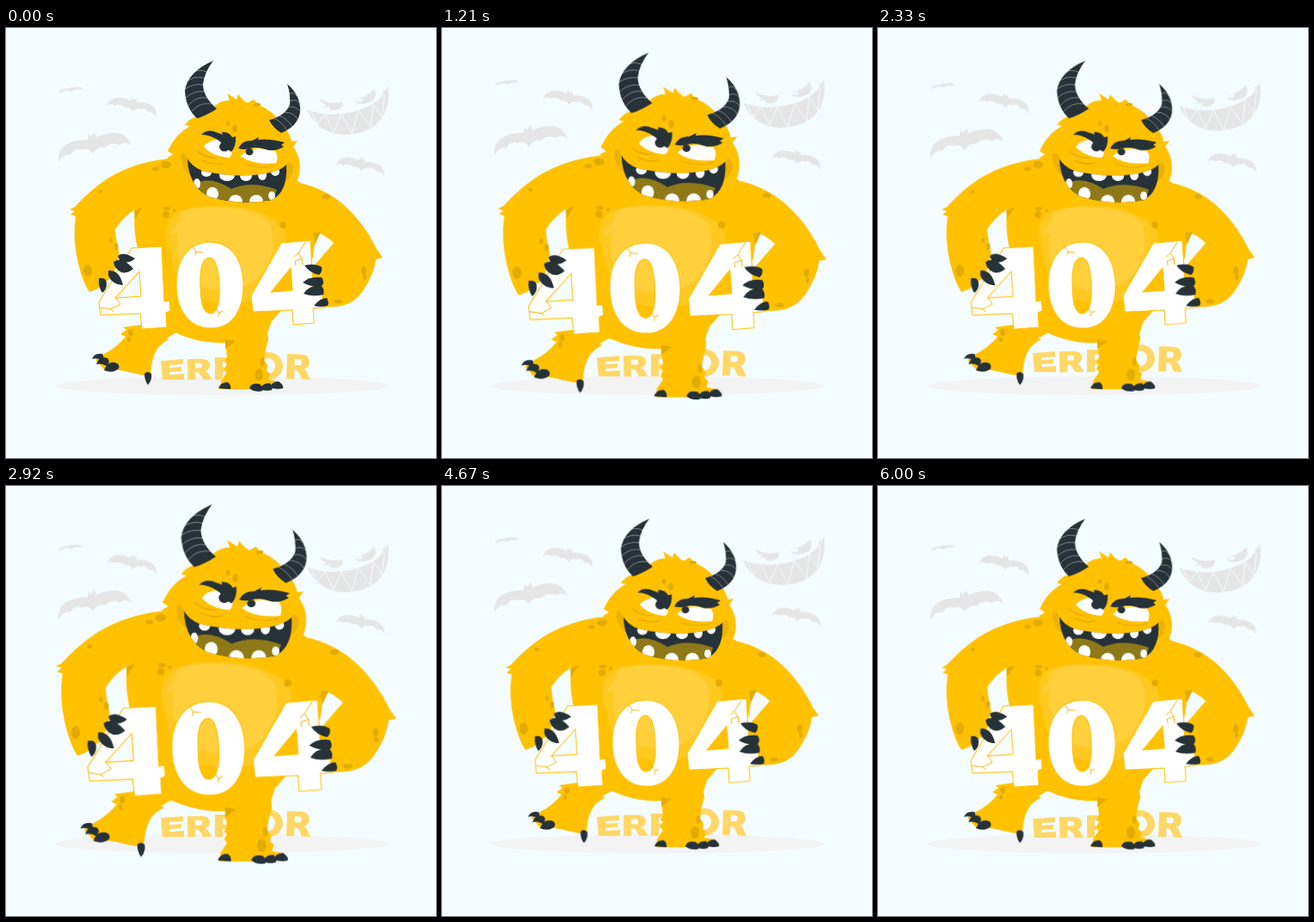
An HTML page for the animation above (6.04 s loop, 500 px wide and 500 px high).

```html
<!DOCTYPE html>
<html lang="en">
<head>
<meta charset="utf-8">
<title>404 error</title>
<style>
  html, body { margin: 0; width: 100%; height: 100%; overflow: hidden; background: #f4fcff; }
  svg { display: block; width: 100%; height: 100%; }
  #monster { transform-origin: 257px 229.5px; }
  .fur { fill: #ffc100; }
  .dark { fill: #263238; }
  .shade { fill: #e3ab00; }
  .grey { fill: #e6e6e6; }
  .white { fill: #fff; }
  .digit { fill: #fff; stroke: #ffc100; stroke-width: 1; fill-rule: evenodd; }
  .line { fill: none; stroke-linecap: round; stroke-linejoin: round; }
</style>
</head>
<body>
<svg viewBox="0 0 500 500" role="img" aria-label="404 ERROR">
  <defs>
    <path id="bat" d="M61 156Q60 142 69 136Q80 129 95 130L96 123L99 126L103 121L105 127Q116 122 127 122Q141 123 146 137Q140 131 132 136Q123 132 115 139Q107 137 101 146Q95 138 88 142Q81 138 75 147Q66 146 61 156Z"/>
    <path id="r" fill-rule="evenodd" d="M0 0H16Q26 0 26 8Q26 13 20 15Q23 16 24 18L28 25H18L14 18Q13 16 9 16V25H0ZM9 5V11H14Q17 11 17 8T14 5Z"/>
    <path id="mouth" d="M211 152Q216 161 228 166Q270 176 308 168Q320 165 326 159Q328 190 309 200Q272 207 236 196Q212 184 211 152Z"/>
    <clipPath id="lips"><use href="#mouth"/></clipPath>
  </defs>

  <g id="sky" class="grey">
    <use href="#bat"/>
    <use href="#bat" transform="matrix(-.682 0 0 .682 216.6 -2.4)"/>
    <use href="#bat" transform="matrix(-.67 0 0 .67 480.9 68.5)"/>
    <use href="#bat" transform="matrix(.33 0 0 .22 41.9 41.7)"/>
    <path d="M350 95Q374 104 401 98Q428 92 439 77L438 73L442 72L444 67Q448 92 434 109Q419 124 393 124Q363 123 350 95Z"/>
    <path d="M364 82Q375 89 391 86Q394 92 386 95Q380 97 375 94L378 91Q374 93 368 92L373 90Q367 88 364 82ZM403 83Q418 82 428 71Q432 78 427 84Q420 89 411 88Q407 88 406 85L413 86L415 82Z"/>
    <path class="line" stroke="#f4fcff" stroke-width="1" d="M355 97L362 112L371 100L381 121L390 100L402 123L410 96L424 116L427 88L437 104L440 78"/>
  </g>

  <ellipse cx="251" cy="416" rx="194" ry="11" fill="#f3f3f3"/>

  <g id="word" fill="#ffd766">
    <path d="M180 387L206 385V391L190 392V395L204 394V399L190 400V403L207 402V409H182Z"/>
    <use href="#r" transform="translate(211 385) rotate(-1) scale(1 .97)"/>
    <use href="#r" transform="translate(243 383) scale(1 1.04)"/>
    <path fill-rule="evenodd" d="M288 393A17 16 0 0 1 322 393A17 16 0 0 1 288 393ZM297 393A8 9 0 0 0 313 393A8 9 0 0 0 297 393Z"/>
    <use href="#r" transform="translate(327 379) rotate(2) scale(1 1.16)"/>
  </g>

  <g id="monster">
    <g class="fur">
      <path d="M205 149L188 152Q149 156 118 175Q97 189 80 208L74 211L80 213L75 217L81 219Q77 245 84 274Q89 295 97 307L107 303L114 296L124 290L132 264Q128 248 127 234Q136 220 150 211L214 200Z"/>
      <path d="M330 178Q366 183 392 205Q416 226 431 257L438 267L430 269Q428 286 416 304Q405 322 384 324L364 325L350 312L356 279L381 250Q372 241 360 237L320 230Z"/>
      <path d="M204 150L150 211Q147 236 155 265L161 330L192 352Q224 368 258 366L310 340L345 300L357 266L361 236L342 180L300 150Z"/>
      <path d="M165 332L158 345L136 348L140 351L133 356L139 359Q128 372 114 379L104 386L114 397Q134 397 146 401L160 404L168 402Q169 384 176 373Q180 367 190 362L186 361L200 353L250 330Z"/>
      <path d="M254 358L257 383L254 388L257 391L254 396L257 400L250 411L249 420H286L319 418L317 411L305 409L307 402L303 399L304 392L300 386Q301 374 305 362L304 355L309 340Z"/>
      <path d="M204 160L187 151L194 147L188 143Q197 123 214 114L208 113Q213 105 222 103L242 91Q250 84 260 84L257 76L268 83L270 77Q276 85 281 87L288 83L293 89Q311 96 323 114Q331 124 332 132L339 131L334 138Q344 152 341 170Q339 180 330 190L240 205Z"/>
    </g>

    <g class="white">
      <path opacity=".13" d="M187 242Q184 224 200 214Q223 205 250 207Q284 207 305 219Q328 229 326 250Q328 290 306 310Q270 326 226 316Q198 306 193 269L185 241Z"/>
      <path opacity=".12" d="M203 222Q198 211 225 209Q292 205 308 230Q317 262 294 290Q260 315 222 298Q193 275 200 238L190 240Z"/>
    </g>

    <g id="spots" class="shade">
      <path d="M149 212L159 208L150 222ZM357 238L366 237L359 252ZM255 362L267 364L255 373Z"/>
    </g>

    <g class="dark">
      <path d="M241 38Q211 51 208 73Q209 93 222 105Q231 103 245 94Q229 80 229 65Q231 51 241 38Z"/>
      <path d="M327 65Q343 79 342 97Q340 114 320 122Q310 116 306 107Q325 102 330 89Q331 77 327 65Z"/>
    </g>
    <path class="line" stroke="#fff" stroke-width=".6" opacity=".65" d="M216 52Q225 47 233 51M210 62Q220 55 230 58M208 71Q218 64 229 66M209 81Q219 72 231 74M212 90Q221 79 234 81M216 97Q224 86 239 88M330 76Q335 74 338 79M330 85Q337 82 341 87M329 92Q337 90 342 97M324 98Q335 98 339 106M318 102Q328 106 332 114M312 105Q322 110 326 118"/>

    <g class="shade" opacity=".65">
      <path d="M211 151Q205 140 203 149Q202 162 215 172Q211 162 211 151Z"/>
      <path d="M326 158Q330 153 334 161Q334 173 324 179Z"/>
    </g>
    <path class="line" stroke="#e3ab00" stroke-width="1.2" d="M222 143Q231 151 245 151M229 154Q242 160 252 157M277 158Q294 165 312 160"/>

    <g class="white">
      <path d="M230 138Q236 130 247 130L263 142Q263 149 259 151Q239 149 230 138Z"/>
      <path d="M273 149Q280 141 294 140L313 143Q317 149 314 157Q287 160 273 149Z"/>
    </g>
    <g class="dark">
      <ellipse cx="254" cy="138" rx="6" ry="5.5"/>
      <ellipse cx="283" cy="144" rx="4.5" ry="4"/>
      <path d="M227 124Q233 118 241 120L252 124L251 121Q259 120 263 127L267 126Q268 137 262 144Q253 139 249 132Q238 124 227 124Z"/>
      <path d="M270 140Q275 130 286 131L294 127L293 130Q306 128 324 133L320 136L323 138Q315 143 305 142Q291 137 284 140Q277 142 270 140Z"/>
      <use href="#mouth"/>
    </g>
    <g clip-path="url(#lips)">
      <path fill="#8e7919" d="M220 181Q237 171 262 187Q286 177 315 188L309 204H235Z"/>
      <g id="teeth" class="white"></g>
    </g>

    <g class="digit">
      <path d="M146 256L181 254L184 318L190 317L191 329L186 331L187 348L158 350L156 332L110 334L108 319ZM155 283L127 314L157 312Z"/>
      <path d="M198 301C197 270 212 250 235 249C261 248 275 268 276 297C277 329 262 349 239 349C215 350 199 331 198 301ZM226 300C226 320 230 332 238 332C246 331 249 318 248 298C247 279 244 267 236 267C229 268 225 279 226 300Z"/>
      <path d="M320 250L354 247L357 304L367 303L369 325L357 326L358 343L334 345L333 328L287 330L285 311ZM331 279L308 307L333 305Z"/>
    </g>
    <path class="line" stroke="#efb300" stroke-width=".9" d="M109 325L122 327L133 321L128 314M122 327L125 330M217 254L221 260L229 261M221 260L220 264M244 326L248 331L247 335M248 331L252 329M348 249L340 262L344 268L336 271L337 276M340 262L335 266M344 268L345 275"/>

    <g class="dark">
      <path d="M130 265Q136 259 150 268Q144 274 133 272Z"/>
      <path d="M125 272Q135 265 148 280Q141 286 134 284Q126 280 125 272Z"/>
      <path d="M119 282Q132 281 136 299Q124 299 119 288Z"/>
      <path d="M108 291Q117 289 117 298Q117 304 112 308Q107 301 108 291Z"/>
      <path d="M347 276Q360 273 367 278Q368 284 364 287Q353 285 347 276Z"/>
      <path d="M345 296Q353 288 367 290Q371 296 367 300Q356 302 345 296Z"/>
      <path d="M346 309Q352 299 366 299Q371 304 369 310Q357 313 346 309Z"/>
      <path d="M358 323Q365 314 373 314Q376 319 374 323Q366 325 358 323Z"/>
      <path d="M100 385Q103 377 112 379Q115 383 111 386Q105 383 100 385Z"/>
      <path d="M105 391Q109 380 118 384Q122 388 117 393Q111 389 105 391Z"/>
      <path d="M114 398Q118 387 127 389Q133 391 131 396Q124 402 114 398Z"/>
      <path d="M161 402Q164 398 169 402Q170 410 165 415Q161 410 161 402Z"/>
      <path d="M247 419Q250 411 258 412Q262 415 261 420Z"/>
      <path d="M283 419Q285 412 295 414Q300 418 298 422Q289 424 283 419Z"/>
      <path d="M296 420Q298 412 307 413Q311 418 309 421Q302 423 296 420Z"/>
      <path d="M307 418Q309 411 317 411Q323 415 322 419Q314 421 307 418Z"/>
    </g>
  </g>
</svg>
<script>
const LOOP = 6040;
const byId = id => document.getElementById(id);

// Each entry: cx, cy, rx, ry
const spots = [
  [186, 159, 6, 4], [174, 164, 4, 2.5], [187, 210, 4, 2.2], [186, 217, 4, 4], [196, 212, 2, 2],
  [95, 282, 5, 7], [122, 247, 2, 3], [128, 254, 2.5, 4], [110, 190, 2.5, 2],
  [258, 111, 2.2, 3], [266, 117, 3, 4.5], [292, 89, 4, 2],
  [372, 196, 5, 3], [322, 229, 4, 4], [416, 282, 3, 5], [417, 290, 2, 3], [386, 318, 5, 2.5],
  [145, 354, 3, 4], [143, 362, 2, 3], [294, 403, 5, 7], [298, 388, 2.5, 5]
];
const teeth = [
  [233, 168, 6, 5], [257, 171, 9, 7], [279, 172, 7, 6], [298, 171, 5, 6], [313, 167, 5, 5],
  [222, 181, 4, 6], [240, 193, 7, 8], [267, 202, 8, 8], [291, 202, 8, 8], [309, 195, 4, 5]
];

function addOvals(id, list) {
  for (const [cx, cy, rx, ry] of list) {
    const oval = document.createElementNS("http://www.w3.org/2000/svg", "ellipse");
    for (const [key, value] of Object.entries({ cx, cy, rx, ry })) oval.setAttribute(key, value);
    byId(id).append(oval);
  }
}

// Steps are [time in ms, transform]
function play(id, steps) {
  const frames = steps.map(([time, transform]) => ({ offset: time / LOOP, transform }));
  byId(id).animate(frames, { duration: LOOP, iterations: Infinity, easing: "linear" });
}

function bob(id, half) {
  const steps = [];
  for (let i = 0; i * half <= 6000; i++) {
    steps.push([i * half, `translateY(${i % 2 ? -10 : 0}px)`]);
  }
  play(id, [...steps, [LOOP, "translateY(0px)"]]);
}

addOvals("spots", spots);
addOvals("teeth", teeth);
bob("sky", 1500);
bob("word", 750);
play("monster", [
  [0, 1], [600, 1.1], [1800, 1], [2400, 1], [3000, 1.1], [3600, 1], [LOOP, 1]
].map(([time, size]) => [time, `scale(${size})`]));
</script>
</body>
</html>
```
